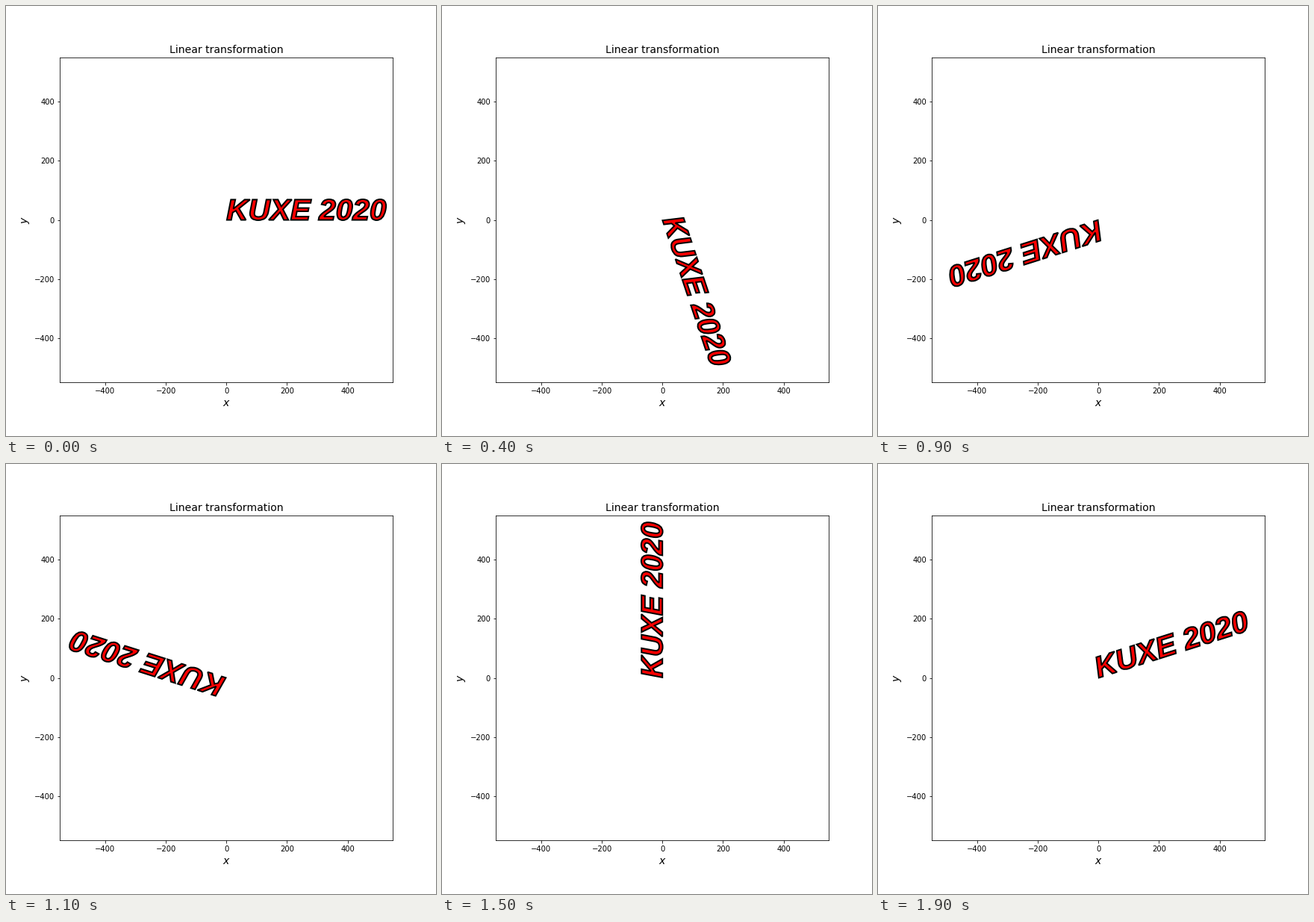
Write a matplotlib script that moves like this. It is 576 px wide and 576 px high and loops after 2 s.

```python
import matplotlib.pyplot as plt
from matplotlib.animation import FuncAnimation
from matplotlib.patches import PathPatch
from matplotlib.textpath import TextPath
from matplotlib.transforms import Affine2D

FRAMES = 20
INTERVAL = 100
LIMIT = 550

# Whole-pixel kerning gives the title its letter spacing.
plt.rcParams.update({"font.family": "DejaVu Sans", "font.size": 10,
                     "text.kerning_factor": 6})

fig, ax = plt.subplots(figsize=(8, 8), dpi=72)
fig.subplots_adjust(left=0.125, right=0.9, bottom=0.125, top=0.88)
ax.set(xlim=(-LIMIT, LIMIT), ylim=(-LIMIT, LIMIT),
       xticks=range(-400, 401, 200), yticks=range(-400, 401, 200))
ax.set_title("Linear transformation", fontsize=14)
ax.set_xlabel("$x$", fontsize=14)
ax.set_ylabel("$y$", fontsize=14)

font = {"family": "Liberation Sans", "weight": "bold", "style": "italic"}
word = PathPatch(TextPath((0, 0), "KUXE 2020", size=100, prop=font),
                 facecolor="red", edgecolor="black", linewidth=2)
ax.add_patch(word)


def update(i):
    """Turn the word clockwise about the origin, in data space."""
    turn = Affine2D().rotate_deg(-360 * i / FRAMES)
    word.set_transform(turn + ax.transData)
    return (word,)


def init():
    return update(0)


anim = FuncAnimation(fig, update, frames=FRAMES, init_func=init,
                     interval=INTERVAL, repeat=True, repeat_delay=0)
plt.show()
```
